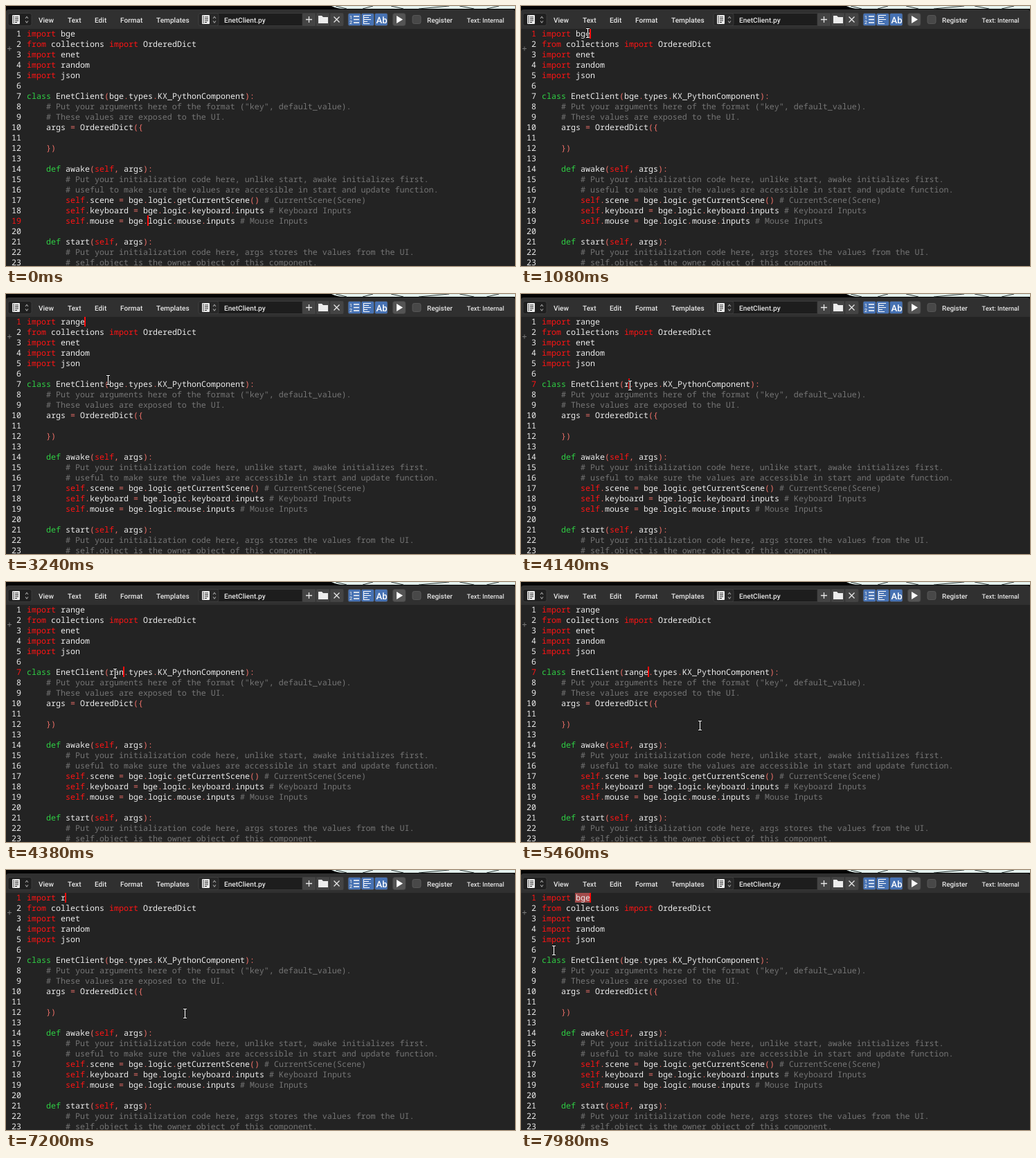
Animation, 735 px wide and 375 px high, one loop 8000 ms. Source, as an HTML page:

```html
<!DOCTYPE html>
<html lang="en">
<head>
<meta charset="utf-8">
<title>Text editor</title>
<style>
html, body { margin: 0; width: 100%; height: 100%; overflow: hidden; background: #232323; }
svg { display: block; width: 735px; height: 375px; }
text { white-space: pre; text-rendering: geometricPrecision; }
.code { font: 500 11.667px "Noto Sans Mono", monospace; }
.ui { font: 500 10.1px Roboto, sans-serif; fill: #e6e6e6; }
</style>
</head>
<body>
<svg id="stage" viewBox="0 0 735 375" xmlns="http://www.w3.org/2000/svg">
  <rect width="735" height="375" fill="#232323"/>
  <rect id="mark" fill="#a24a4a" height="15"/>
  <g id="lines" class="code"></g>
  <rect id="caret" fill="#ff0d0d" width="2" height="15"/>
  <path d="M2 61.500H8M5 58.500V64.500" stroke="#777" fill="none"/>

  <rect width="735" height="7" fill="#050505"/>
  <path d="M470 0H735V4H488Q478 4 470 0Z" fill="#e4f1ee"/>
  <path d="M476 0L492 4M515 4L530 0M556 0L574 4M596 4L640 0M655 0L676 4M694 4L712 0" stroke="#26302f" fill="none"/>
  <path d="M0 33V9Q0 5 4 5H731Q735 5 735 9V33Z" fill="#303030"/>
  <g id="bar"></g>
  <g id="beam" fill="none">
    <path d="M1 1.500H6M3.500 1.500V14.500M1 14.500H6" stroke="#0a0a0a" stroke-width="3"/>
    <path d="M1 1.500H6M3.500 1.500V14.500M1 14.500H6" stroke="#fff" stroke-width="1.200"/>
  </g>
</svg>
<script>
const NS = 'http://www.w3.org/2000/svg';
const LOOP = 8000, LEFT = 30, TOP = 32, CW = 7, LH = 15;
const WHITE = '#ececec', RED = '#ff1414', GREEN = '#2fd044', SYMBOL = '#ee7068', GREY = '#757575';
const WORDS = { import: RED, from: RED, self: RED, class: GREEN, def: GREEN };
const $ = id => document.getElementById(id);

function add(parent, tag, attrs, text) {
  const el = document.createElementNS(NS, tag);
  for (const k in attrs) el.setAttribute(k, attrs[k]);
  if (text !== undefined) el.textContent = text;
  parent.appendChild(el);
  return el;
}
const set = (el, attrs) => { for (const k in attrs) el.setAttribute(k, attrs[k]); };

// Header
const bar = $('bar');
const box = (x, w, fill, r = 3) => add(bar, 'rect', { x, y: 10.5, width: w, height: 18, rx: r, fill, stroke: '#424242', 'stroke-width': 0.7 });
const line = (d, stroke = '#e6e6e6', width = 1.3) => add(bar, 'path', { d, stroke, 'stroke-width': width, fill: 'none' });
const label = (x, s, size) => add(bar, 'text', { x, y: 23.7, class: 'ui', style: size ? `font-size:${size}px` : '' }, s);

function docIcon(x) {
  add(bar, 'rect', { x, y: 13, width: 11, height: 13, rx: 1, fill: '#ececec' });
  line(`M${x + 4} 16H${x + 9}M${x + 4} 18.500H${x + 9}M${x + 4} 21H${x + 9}M${x + 4} 23.500H${x + 7}`, '#262626', 1);
  line(`M${x + 2} 14V25`, '#262626', 0.8);
}
const arrows = x => line(`M${x - 2} 18L${x} 15.500L${x + 2} 18M${x - 2} 21.500L${x} 24L${x + 2} 21.500`, '#a0a0a0', 1.1);

box(3, 34, '#1f1f1f');
docIcon(9);
arrows(30);
[[47, 'View'], [89, 'Text'], [128, 'Edit'], [165, 'Format'], [217, 'Templates']].forEach(([x, s]) => label(x, s));
box(278, 209, '#1d1d1d');
box(278, 29, '#282828');
docIcon(283);
arrows(301);
label(315, 'EnetClient.py');
[428, 448, 468].forEach(x => box(x, 19, '#444', 1));
line('M433 19.500H442M437.500 15V24');
add(bar, 'path', { d: 'M451 14H456L458 16H465V25H451Z', fill: '#ececec' });
line('M473.500 15.500L481.500 23.500M481.500 15.500L473.500 23.500');
[494, 513, 532.5].forEach(x => box(x, 18.5, '#4772b3', 2));
line('M502 15H510M502 19.500H510M502 24H510', '#fff');
add(bar, 'text', { x: 496, y: 18.5, class: 'ui', style: 'font-size:7px' }, '1');
add(bar, 'text', { x: 496, y: 26, class: 'ui', style: 'font-size:7px' }, '2');
line('M516 13.500H527M516 16.500H524M516 19.500H527M516 22.500H522M516 25.500H525', '#fff', 1.2);
line('M516.500 13V26', '#fff', 1);
add(bar, 'text', { x: 534.5, y: 24.5, class: 'ui', style: 'font-size:13px;fill:#fff' }, 'Ab');
box(558.5, 18.5, '#545454');
add(bar, 'path', { d: 'M564 14L573 19.500L564 25Z', fill: '#fff' });
add(bar, 'rect', { x: 587, y: 13.5, width: 12, height: 12, rx: 2.5, fill: '#484848', stroke: '#565656' });
label(608, 'Register', 9.9);
label(665.5, 'Text: Internal', 9.2);

// Code
const source = `import bge
from collections import OrderedDict
import enet
import random
import json

class EnetClient(bge.types.KX_PythonComponent):
    # Put your arguments here of the format ("key", default_value).
    # These values are exposed to the UI.
    args = OrderedDict({

    })

    def awake(self, args):
        # Put your initialization code here, unlike start, awake initializes first.
        # useful to make sure the values are accessible in start and update function.
        self.scene = bge.logic.getCurrentScene() # CurrentScene(Scene)
        self.keyboard = bge.logic.keyboard.inputs # Keyboard Inputs
        self.mouse = bge.logic.mouse.inputs # Mouse Inputs

    def start(self, args):
        # Put your initialization code here, args stores the values from the UI.
        # self.object is the owner object of this component.`.split('\n');

const colour = tok => tok[0] === '#' ? GREY : WORDS[tok] || (/\w/.test(tok) ? WHITE : SYMBOL);

function paint(el, str, bold) {
  el.textContent = '';
  for (const m of str.matchAll(/#.*|\w+|[^\w\s]/g)) {
    const hot = bold && (m.index === 16 || m[0] === ')');
    const span = add(el, 'tspan', { x: LEFT + m.index * CW, fill: hot ? RED : colour(m[0]) }, m[0]);
    if (hot) set(span, { stroke: RED, 'stroke-width': 0.6 });
  }
}

const rows = source.map((str, i) => {
  const y = TOP + LH * i + 12;
  const num = add($('lines'), 'text', { x: i < 9 ? 15 : 8, y, fill: WHITE }, i + 1);
  const text = add($('lines'), 'text', { y });
  paint(text, str);
  return { num, text };
});

// Time, word on line 1, word on line 7, caret line, caret column, selected
const START = { 1: 7, 7: 17 };
const edits = [[0, 'bge', 'bge', 19, 25], [1080, 'bge', 'bge', 1], [1200, 'bge', 'bge', 1, 0, true]];
const put = (row, list) => list.forEach(([t, word]) => {
  const pair = row === 1 ? [word, 'bge'] : ['range', word];
  edits.push([t, ...pair, row, 0, word === 'bge']);
});
put(1, [[1800, 'r'], [1920, 'ra'], [2100, 'ran'], [2220, 'rang'], [2400, 'range']]);
edits.push([3480, 'range', 'bge', 7, 18]);
put(7, [[3600, 'bge'], [4140, 'r'], [4200, 'ra'], [4380, 'ran'], [4560, 'rang'], [4680, 'range'],
  [5520, 'rang'], [5640, 'ran'], [5820, 'ra'], [5940, 'r'], [6120, 'bge']]);
put(1, [[6480, 'rang'], [6840, 'ran'], [7020, 'ra'], [7200, 'r'], [7440, 'bge']]);

// Time and corner of the pointer; no corner means hidden
const moves = [[0], [360, 400, 68], [420], [840, 103, 31], [900], [1080, 93, 31], [1440],
  [3000, 112, 50], [3060, 123, 74], [3120, 132, 94], [3180, 139, 108], [3240, 144, 116],
  [3300, 150, 121], [3360, 154, 124], [5400, 212, 166], [5460, 255, 199]];
for (let i = 1; i <= 6; i++) {
  const p = i / 6, e = p * p * (3 - 2 * p);
  moves.push([7620 + 60 * i, Math.round(255 - 211 * e), Math.round(199 - 91 * e)]);
}

const at = (list, t) => list.findLast(step => step[0] <= t);
let shown;

function showEdit(step) {
  const [, first, seventh, row, col, selected] = step;
  const bold = selected && row === 7;
  paint(rows[0].text, 'import ' + first);
  paint(rows[6].text, `class EnetClient(${seventh}.types.KX_PythonComponent):`, bold);
  rows.forEach((r, i) => set(r.num, { fill: i + 1 === row ? RED : WHITE }));
  const from = START[row], word = row === 1 ? first : seventh;
  const y = TOP + LH * (row - 1);
  set($('caret'), { x: LEFT + CW * (col || from + word.length) - 1, y });
  set($('mark'), selected ? { x: LEFT + CW * from - 1, y, width: CW * word.length + 2 } : { width: 0 });
}

function draw(t) {
  const step = at(edits, t);
  if (step !== shown) showEdit(shown = step);
  const [, x, y] = at(moves, t);
  set($('beam'), x === undefined ? { visibility: 'hidden' } : { visibility: 'visible', transform: `translate(${x} ${y})` });
}

const begin = performance.now();
function tick() {
  draw((performance.now() - begin) % LOOP);
  requestAnimationFrame(tick);
}
tick();
</script>
</body>
</html>
```
